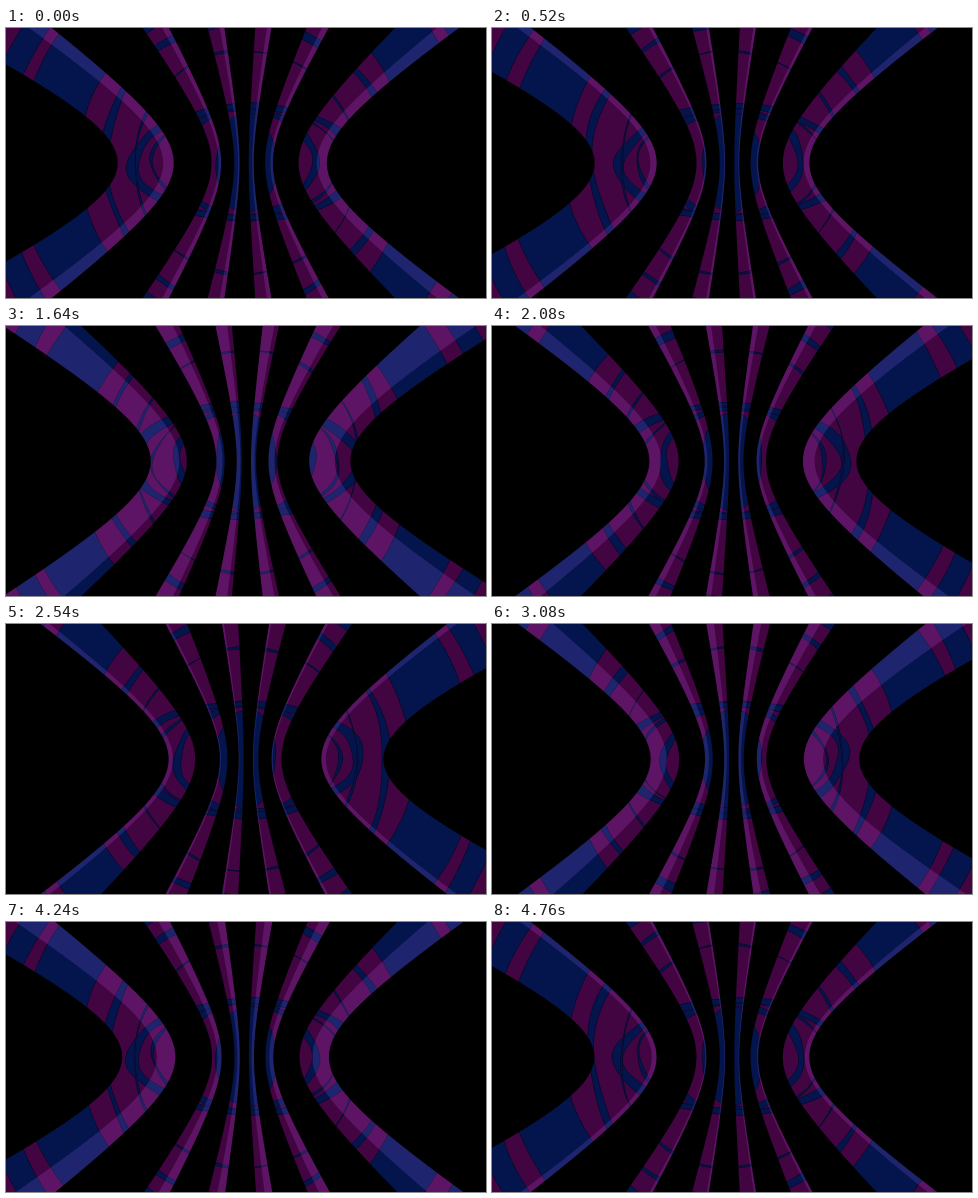
An HTML page with a canvas for the animation above (4.78 s loop, 480 px wide and 270 px high).

```html
<!DOCTYPE html>
<html lang="en">
<head>
<meta charset="utf-8">
<title>Swaying ribbons</title>
<style>
  html, body { margin: 0; width: 100%; height: 100%; overflow: hidden; background: #000; }
  canvas { display: block; width: 480px; height: 270px; }
</style>
</head>
<body>
<canvas id="stage" width="480" height="270"></canvas>
<script>
const ctx = document.getElementById('stage').getContext('2d');
const LOOP = 4780, SWAY = 4350, PEAK = 2615;
const CX = 240, CY = 135, FOCAL = 29.6;
const WIDTH = 0.162, STEP = 0.483, FIRST = 0.235;
const PURPLE = 'rgb(67,4,66)', NAVY = 'rgb(4,20,76)', EDGE = 'rgb(6,8,46)', GLOW = 'rgb(27,16,34)';

const centers = [0, 1, 2].flatMap(i => [FIRST + i * STEP, -FIRST - i * STEP]);

// Blue rings: inner radius, outer radius, wobble, x scale, y scale.
const rings = [
  [0, 50, 2, 0.6, 1], [64, 71, 3, 1, 0.8], [92, 94, 3, 1, 0.6], [106, 117, 4, 1, 0.5],
  [111, 112.5, 2, 1, 1], [139, 145, 4, 1, 1], [165, 226, 3, 1, 1], [241, 264, 3, 1, 1]
];

// Position of the lit strip across a ribbon: time, offset in ribbon widths.
const lit = [
  [-500, 0.5], [0, 0.72], [440, 0.86], [960, 0.53], [1640, -0.28], [2560, -0.88],
  [3600, 0], [4240, 0.53], [4780, 0.88], [5300, 0.7]
];

function spline(keys, t) {
  let i = 1;
  while (i < keys.length - 3 && t > keys[i + 1][0]) i++;
  const [a, b, c, d] = keys.slice(i - 1, i + 3);
  const h = c[0] - b[0], u = (t - b[0]) / h;
  const m0 = (c[1] - a[1]) / (c[0] - a[0]) * h;
  const m1 = (d[1] - b[1]) / (d[0] - b[0]) * h;
  const u2 = u * u, u3 = u2 * u;
  return (2 * u3 - 3 * u2 + 1) * b[1] + (u3 - 2 * u2 + u) * m0 +
         (3 * u2 - 2 * u3) * c[1] + (u3 - u2) * m1;
}

function edgeX(angle, y) {
  const a = FOCAL * Math.tan(angle), dy = y - CY;
  return CX + a * Math.sqrt(1 + dy * dy / (1700 + 17 * Math.abs(a)));
}

function strip(from, to) {
  ctx.moveTo(edgeX(from, -3), -3);
  for (let y = 0; y <= 273; y += 3) ctx.lineTo(edgeX(from, y), y);
  for (let y = 273; y >= -3; y -= 3) ctx.lineTo(edgeX(to, y), y);
  ctx.closePath();
}

function ringEdge(r, wobble, sx, sy, phase) {
  const n = 180;
  for (let i = 0; i < n; i++) {
    const a = i / n * 2 * Math.PI;
    const shift = Math.sin(3 * a + phase) * 0.6 + Math.sin(7 * a - 2.3 * phase) * 0.4;
    const q = r + wobble * shift;
    const x = CX + q * sx * Math.cos(a), y = CY + q * sy * Math.sin(a);
    i ? ctx.lineTo(x, y) : ctx.moveTo(x, y);
  }
  ctx.closePath();
}

function draw(t) {
  const sway = 0.077 * Math.cos(2 * Math.PI * (t - PEAK) / SWAY);
  const offset = spline(lit, t) * WIDTH;
  const phase = 2 * Math.PI * t / LOOP;
  const starts = centers.map(c => c + sway - WIDTH / 2);

  ctx.globalCompositeOperation = 'source-over';
  ctx.clearRect(0, 0, 480, 270);
  ctx.fillStyle = PURPLE;
  ctx.beginPath();
  for (const a of starts) strip(a, a + WIDTH);
  ctx.fill();

  ctx.globalCompositeOperation = 'source-atop';
  ctx.fillStyle = NAVY;
  ctx.strokeStyle = EDGE;
  ctx.lineWidth = 1;
  rings.forEach(([r0, r1, wobble, sx, sy], i) => {
    const seed = i * 1.7 + phase;
    ctx.beginPath();
    if (r0) ringEdge(r0, wobble, sx, sy, seed);
    ringEdge(r1, wobble, sx, sy, seed + 0.5);
    ctx.fill('evenodd');
    ctx.stroke();
  });

  ctx.globalCompositeOperation = 'lighter';
  ctx.fillStyle = GLOW;
  ctx.beginPath();
  for (const a of starts) strip(a + Math.max(0, offset), a + WIDTH + Math.min(0, offset));
  ctx.fill();
}

const start = performance.now();
function tick() {
  draw((performance.now() - start) % LOOP);
  requestAnimationFrame(tick);
}
tick();
</script>
</body>
</html>
```
